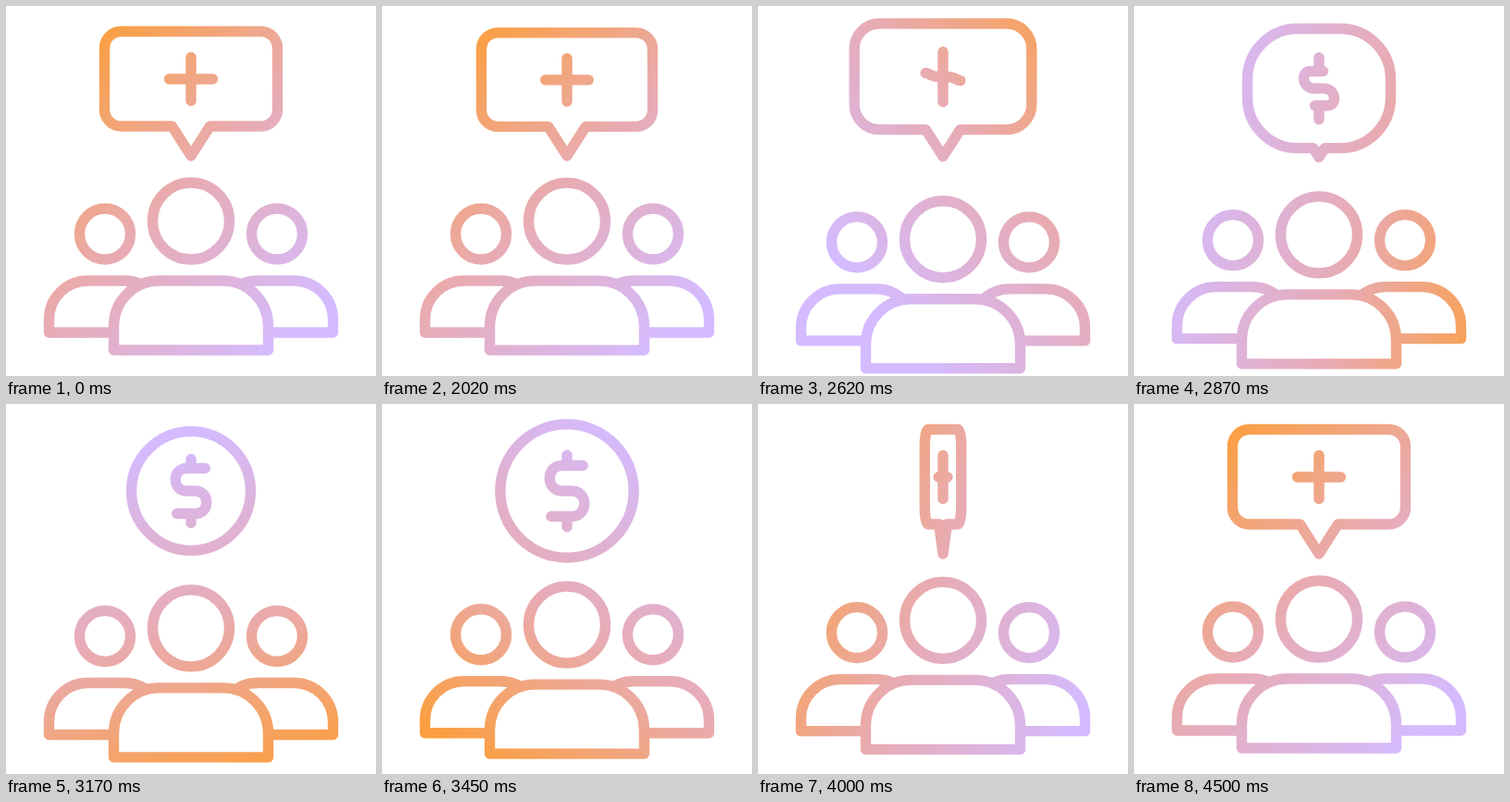
These frames come from a looping animation (400x400 px, 4520 ms). An HTML page with a canvas:

```html
<!DOCTYPE html>
<html lang="en">
<head>
<meta charset="utf-8">
<title>Group benefits</title>
<style>
  html, body { margin: 0; height: 100%; overflow: hidden; background: #fff; }
  canvas { display: block; width: 100vmin; height: 100vmin; }
</style>
</head>
<body>
<canvas width="400" height="400"></canvas>
<script>
const ctx = document.querySelector('canvas').getContext('2d');
const LOOP = 4520, START = 2000, END = 4500;

const lerp = (a, b, k) => a + (b - a) * k;
const progress = (t, from, to) => Math.min(1, Math.max(0, (t - from) / (to - from)));
const smooth = x => x * x * (3 - 2 * x);

// Gradient rotation in radians, one full turn
const turn = t => 2 * Math.PI * smooth(progress(t, START, END) ** 0.78);
// People sink quickly, then rise slowly
const dip = t => 20.6 * smooth(progress(t, START, 2580)) * (1 - progress(t, 2580, END)) ** 2;
// Badge shrinks and swells twice
const pop = t => 1 - 0.07 * Math.sin(4 * Math.PI * progress(t, START, 3800));
const morph = t => smooth(progress(t, 2470, 3100));
const flip = t => progress(t, 3548, 4346);

// The colours drift towards the orange end while the people are low
function gradient(angle, drift) {
  const dx = Math.cos(angle + Math.PI / 4), dy = Math.sin(angle + Math.PI / 4);
  const near = -190 - drift, far = 190 - drift;
  const g = ctx.createLinearGradient(200 + near * dx, 200 + near * dy, 200 + far * dx, 200 + far * dy);
  g.addColorStop(0, '#fb9f42');
  g.addColorStop(0.48, '#e8abb3');
  g.addColorStop(1, '#d4bbff');
  return g;
}

function head(x, y, r) {
  ctx.beginPath();
  ctx.arc(x, y, r, 0, 2 * Math.PI);
  ctx.stroke();
}

function body(left, top, width, height, r) {
  ctx.beginPath();
  ctx.roundRect(left, top, width, height, [r, r, 0, 0]);
  ctx.fill();
  ctx.stroke();
}

function people(shift) {
  const side = shift * 0.45;
  head(107, 246.5 + side, 27.5);
  head(293, 246.5 + side, 27.5);
  body(46.5, 297 + side, 123.5, 56, 42);
  body(230, 297 + side, 123.5, 56, 42);
  head(200, 232.5 + shift, 41.5);
  body(116.5, 297 + shift, 167, 75, 49);
}

// Upper half of the dollar's S, from its end to the centre; the rest mirrors it
const halfS = [[16.4, -26.3], [-4.8, -26.3], [-22.3, -26.3], [-22.3, 0], [-4.8, 0]];

// One half of the sign: dir 1 is the upper left, -1 the lower right
function halfSign(m, mid, dir) {
  const p = halfS.map(([x, y], i) => [
    dir * lerp(-23.5 * (1 - i / 5), x, m),
    mid + dir * y * m
  ]);
  ctx.moveTo(...p[0]);
  ctx.lineTo(...p[1]);
  ctx.bezierCurveTo(...p[2], ...p[3], ...p[4]);
  ctx.lineTo(0, mid);
  ctx.moveTo(0, mid - dir * lerp(23.5, 37, m));
  ctx.lineTo(0, mid - dir * 26.3 * m);
}

// Speech bubble with plus (m = 0) to coin with dollar (m = 1)
function badge(m, scaleX, scaleY) {
  const anchor = lerp(162, 94, m), mid = lerp(79, 94, m);
  const w = lerp(93.5, 69, m), r = lerp(18, 69, m);
  const top = lerp(27.5, 25, m), bottom = lerp(130, 163, m);
  const tip = lerp(162, 163, m), base = lerp(20.5, 0, m);

  ctx.save();
  ctx.translate(200, anchor);
  ctx.scale(scaleX, scaleY);
  ctx.translate(0, -anchor);
  ctx.beginPath();
  ctx.moveTo(0, tip);
  ctx.lineTo(-base, bottom);
  ctx.arcTo(-w, bottom, -w, bottom - r, r);
  ctx.arcTo(-w, top, r - w, top, r);
  ctx.arcTo(w, top, w, top + r, r);
  ctx.arcTo(w, bottom, w - r, bottom, r);
  ctx.lineTo(base, bottom);
  ctx.closePath();
  halfSign(m, mid, 1);
  halfSign(m, mid, -1);
  ctx.restore(); // stroke unscaled so the line weight stays constant
  ctx.stroke();
}

function draw(t) {
  const shift = dip(t), scale = pop(t), turned = flip(t);
  const squeeze = Math.max(0.01, Math.abs(Math.cos(Math.PI * turned)));
  ctx.fillStyle = '#fff';
  ctx.fillRect(0, 0, 400, 400);
  ctx.strokeStyle = gradient(turn(t), 2.7 * shift);
  ctx.lineWidth = 11.4;
  ctx.lineCap = ctx.lineJoin = 'round';
  people(shift);
  badge(turned < 0.5 ? morph(t) : 0, scale * squeeze, scale);
}

const start = performance.now();
function tick() {
  draw((performance.now() - start) % LOOP);
  requestAnimationFrame(tick);
}
tick();
</script>
</body>
</html>
```
